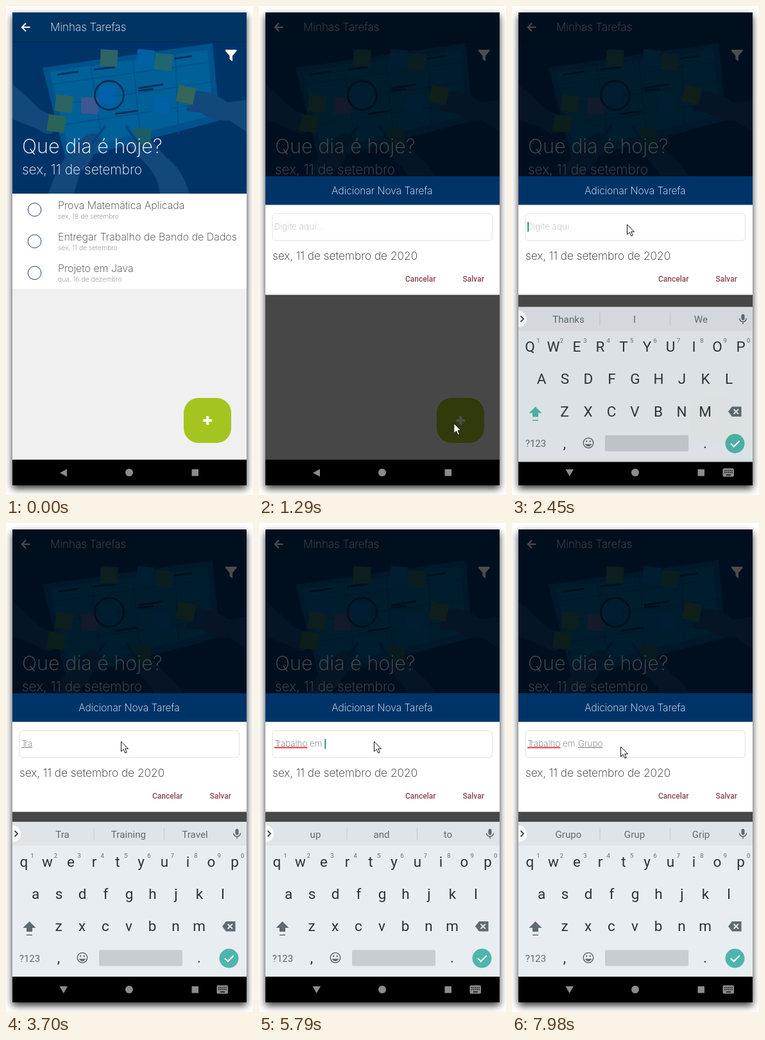
Write an HTML page that moves like this. It is 385 by 761 pixels and loops after 8 s.

```html
<!DOCTYPE html>
<html lang="pt">
<head>
<meta charset="utf-8">
<title>Minhas Tarefas</title>
<style>
html, body { margin: 0; width: 100%; height: 100%; overflow: hidden; background: #fff; }
.phone { position: absolute; left: 10px; top: 10px; width: 365px; height: 736px; box-shadow: 0 5px 11px rgba(0,0,0,.8); }
svg { position: absolute; left: 0; top: 0; display: block; }
text { white-space: pre; }
.thin { font-family: Inter, "Open Sans", sans-serif; font-weight: 200; }
.ui { font-family: Roboto, "Noto Sans", sans-serif; }
.mid { text-anchor: middle; }
.key { font-size: 22.5px; fill: #27343b; }
</style>
</head>
<body>
<div class="phone"></div>
<svg id="stage" width="385" height="761" viewBox="0 0 385 761">
  <defs>
    <clipPath id="heroClip"><rect x="10" y="56" width="365" height="236"/></clipPath>
    <clipPath id="screen"><rect x="10" y="10" width="365" height="736"/></clipPath>
  </defs>
  <g clip-path="url(#screen)">
    <rect x="10" y="56" width="365" height="236" fill="#003468"/>
    <g clip-path="url(#heroClip)" id="hero"></g>
    <rect x="10" y="10" width="365" height="46" fill="#003464"/>
    <rect x="10" y="55.5" width="365" height="1.5" fill="#002c58"/>
    <path d="M37.5 33H25M31 26.8L24.8 33L31 39.2" fill="none" stroke="#fff" stroke-width="2"/>
    <text class="thin" x="69" y="38.5" font-size="17" fill="#fff">Minhas Tarefas</text>
    <path d="M342 68h17.5v2l-6.5 7.5v8.5l-4.5 -3.2v-5.3l-6.5 -7.5z" fill="#fff"/>
    <text class="thin" x="25" y="229" font-size="30.6" fill="#fff">Que dia é hoje?</text>
    <text class="thin" x="25" y="261.5" font-size="21" fill="#fff">sex, 11 de setembro</text>
    <rect x="10" y="292" width="365" height="148" fill="#fff"/>
    <rect x="10" y="440" width="365" height="266" fill="#f0f0f0"/>
    <g id="tasks"></g>
    <rect x="277" y="610" width="74" height="70" rx="23" fill="#a4c520"/>
    <path d="M307.5 645h13.5M314.2 638.3v13.5" stroke="#fff" stroke-width="4"/>
    <rect id="strip" x="10" y="292" width="365" height="10.5" fill="#fff"/>
    <rect id="dim" x="10" width="365" height="736" fill="#000" opacity=".7"/>
    <rect x="10" y="706" width="365" height="40" fill="#000"/>
    <g id="keyboard"></g>
    <g fill="#8c8c8c">
      <path id="back"/>
      <circle cx="192" cy="726" r="6"/>
      <rect x="289.5" y="721" width="10.5" height="10.5"/>
      <g id="kbIcon">
        <rect x="328.5" y="719.5" width="17.5" height="13" rx="2"/>
        <path d="M331 723h13M331 726h13" stroke="#000" stroke-width="1.6" stroke-dasharray="1.6 1.2"/>
        <path d="M334 729.7h7" stroke="#000" stroke-width="1.4"/>
      </g>
    </g>
    <g id="dialog">
      <rect x="10" y="265" width="365" height="45" fill="#003468"/>
      <rect x="10" y="309.5" width="365" height="140" fill="#fff"/>
      <text class="thin mid" x="192" y="292.5" font-size="15.6" fill="#fff">Adicionar Nova Tarefa</text>
      <rect x="21" y="323" width="342.5" height="42" rx="5" fill="#fff" stroke="#dedede"/>
      <text class="thin" id="hint" x="23.5" y="348" font-size="13.6" fill="#b4b4b4">Digite aqui...</text>
      <g class="thin" id="words" font-size="13.5" fill="#666"></g>
      <path id="spell" stroke="#e8383c" stroke-width="1.8"/>
      <path id="compose" stroke="#777" stroke-width="1"/>
      <rect id="caret" y="336" width="1.6" height="15.5" fill="#00796f"/>
      <text class="thin" x="21" y="394.5" font-size="17.3" fill="#222">sex, 11 de setembro de 2020</text>
      <g class="ui" font-size="12" font-weight="500" fill="#8d4650">
        <text x="228" y="429">Cancelar</text>
        <text x="317.5" y="429">Salvar</text>
      </g>
    </g>
    <path id="cursor" d="M0 0V15.5L3.7 12.2L6.3 18L8.7 17L6.2 11.3H11Z" fill="#fff" stroke="#111" stroke-width="1"/>
  </g>
</svg>
<script>
const LOOP = 8000;
const $ = id => document.getElementById(id);
const show = (el, on) => el.setAttribute('visibility', on ? 'inherit' : 'hidden');
// latest row whose time has passed
const at = (rows, t) => rows.reduce((hit, row) => row[0] <= t ? row : hit, null);

function drawHero() {
  const note = (x, y, fill, turn) =>
    `<rect x="${x}" y="${y}" width="27" height="26" fill="${fill}" transform="rotate(${turn} ${x + 13} ${y + 13})"/>`;
  const notes = [
    [147, 68, '#2c6468', 3], [204, 68, '#0060a4', 6], [232, 74, '#206670', 5], [77, 139, '#2c6464', 6],
    [117, 142, '#3c5890', 2], [65, 170, '#2a6458', 8], [145, 126, '#0060aa', -3], [229, 141, '#0060a8', 6],
    [267, 125, '#356658', 12], [199, 190, '#1b5c68', 7]
  ];
  let rules = '';
  for (let i = 1; i < 4; i++) rules += `M${66 + 66 * i} ${102 - 9 * i}L${92 + 59 * i} ${223 - 8 * i}`;
  for (let i = 1; i < 4; i++) rules += `M${67 + 5 * i} ${90 + 32 * i}L${316 + 3 * i} ${56 + 31 * i}`;
  $('hero').innerHTML = `
    <path d="M57 96L322 58L333 178L94 242Z" fill="#00528c"/>
    <path d="M68 102L314 68L323 170L98 226Z" fill="#006098"/>
    <path d="${rules}" stroke="#005088" stroke-width="1.5" fill="none"/>
    <path d="M80 107L113 102M137 99L170 95M262 82L290 78M206 128L245 122M206 132L230 129M170 168L205 163"
      stroke="#00305e" stroke-width="3"/>
    <g fill="#12487c">
      <path d="M10 122Q30 138 54 162L70 169Q82 174 74 182L66 186L74 196Q66 204 50 192L10 176Z"/>
      <path d="M375 146L345 150Q318 130 292 133L272 138Q266 144 278 147L292 150Q276 160 284 164L304 166Q326 182 348 178L375 196Z"/>
      <path d="M66 292Q84 238 112 212Q130 194 142 200L150 208L140 218Q136 242 116 258L106 292Z"/>
      <path d="M286 292Q274 252 250 236L222 204Q208 194 204 202L212 216L198 210Q188 212 196 222L216 244Q236 262 240 292Z"/>
    </g>
    ${notes.map(n => note(...n)).join('')}
    <circle cx="161" cy="139" r="22.5" fill="none" stroke="#00305e" stroke-width="3"/>
    <path d="M122 228L154 188M218 232L188 188" stroke="#00467c" stroke-width="4" stroke-linecap="round"/>`;
}

function drawTasks() {
  const tasks = [
    ['Prova Matemática Aplicada', 'sex, 18 de setembro'],
    ['Entregar Trabalho de Bando de Dados', 'sex, 11 de setembro'],
    ['Projeto em Java', 'qua, 16 de dezembro']
  ];
  $('tasks').innerHTML = tasks.map(([name, when], i) => {
    const y = 317 + 49.2 * i;
    return `<circle cx="44.5" cy="${y}" r="10.3" fill="none" stroke="#1d3c74"/>
      <text class="thin" x="81" y="${y - 1}" font-size="16" fill="#333">${name}</text>
      <text class="thin" x="81" y="${y + 13.5}" font-size="10.4" fill="#777">${when}</text>`;
  }).join('');
}

function drawKeyboard() {
  const row = (letters, x0, y) => [...letters].map((c, i) =>
    `<text class="ui mid key letter" x="${x0 + 36.5 * i}" y="${y}">${c}</text>`).join('');
  const digits = [...'1234567890'].map((c, i) =>
    `<text class="ui mid" x="${41 + 36.4 * i}" y="520.5" font-size="9.5" fill="#5f6c74">${c}</text>`).join('');
  $('keyboard').innerHTML = `
    <rect x="10" y="465" width="365" height="241" fill="#e8edf1"/>
    <rect x="10" y="465" width="365" height="37" fill="#dfe4e8"/>
    <path d="M10 470.5a13 13 0 0 1 0 26z" fill="#fff"/>
    <path d="M13.5 479l4.5 4.5l-4.5 4.5" fill="none" stroke="#38444b" stroke-width="1.8"/>
    <path d="M137 474v20M246.5 474v20" stroke="#c3cacf"/>
    ${[88, 191, 294.5].map(x => `<text class="ui mid idea" x="${x}" y="489.5" font-size="15.2" fill="#5f6b73"></text>`).join('')}
    <rect x="357.5" y="476" width="5" height="9.5" rx="2.5" fill="#5c6a72"/>
    <path d="M354.5 482.5a5.5 5.5 0 0 0 11 0M360 488v3.5" fill="none" stroke="#5c6a72" stroke-width="1.5"/>
    ${digits}${row('qwertyuiop', 28, 534.5)}${row('asdfghjkl', 46, 584.5)}${row('zxcvbnm', 82, 635)}
    <path id="shift" d="M36.5 620l10 10h-5.5v6h-9v-6h-5.5zM32 640.5h9v1.6h-9z"/>
    <path d="M343 620h14.5v15.5h-14.5l-6 -7.75z" fill="#5c6a72"/>
    <path d="M345.5 624l7.5 7.5M353 624l-7.5 7.5" stroke="#e8edf1" stroke-width="1.8"/>
    <text class="ui mid" x="37" y="682.5" font-size="15" fill="#5c6a72">?123</text>
    <text class="ui mid key" x="82" y="684">,</text>
    <text class="ui mid key" x="301" y="684">.</text>
    <g fill="none" stroke="#5c6a72" stroke-width="1.5">
      <circle cx="119" cy="676.5" r="7.8"/><path d="M115 679q4 4.5 8 0z" fill="#5c6a72"/>
    </g>
    <circle cx="116.2" cy="674" r="1.2" fill="#5c6a72"/><circle cx="121.8" cy="674" r="1.2" fill="#5c6a72"/>
    <rect x="145" y="664.5" width="130" height="25" rx="2.5" fill="#c8cdd2"/>
    <circle cx="347.5" cy="677.5" r="15" fill="#4db6ac"/>
    <path d="M341 677.5l4.7 4.7l9 -9" fill="none" stroke="#fff" stroke-width="2.2"/>`;
}

// time, typed text, suggestions
const TYPING = [
  [0, '', 'Thanks|I|We'], [2920, 'T', 'T|The|To'], [3070, 'Tr', 'Tr|Try|True'], [3150, 'Tra', 'Tra|Training|Travel'],
  [4020, 'Trab', 'Trab|Track|Travel'], [4090, 'Traba', 'Traba|Tribal|Travel'],
  [4160, 'Trabal', 'Trabal|Tribal|Travel'], [4480, 'Trabal', 'Trabal|Trial|Tribal'],
  [4860, 'Trabalh', 'Trabalh|Tribal|Trabal'], [5010, 'Trabalho', 'Trabalho|Tribal|Trabalhos'],
  [5090, 'Trabalho ', 'and|the|is'], [5640, 'Trabalho e', 'e|even|every'], [5710, 'Trabalho em', 'em|me|empty'],
  [5790, 'Trabalho em ', 'up|and|to'], [6340, 'Trabalho em G', 'G|Good|Great'], [6570, 'Trabalho em Gr', 'Gr|Great|Green'],
  [6800, 'Trabalho em Gru', 'Gru|Group|Green'], [7270, 'Trabalho em Grup', 'Grup|Group|Groups'],
  [7430, 'Trabalho em Grupo', 'Grupo|Grup|Grip']
];
const CARET = [[0, 0], [2220, 1], [2750, 0], [2920, 1], [3700, 0], [4020, 1], [4480, 0], [4860, 1], [7900, 0]];
const SLIDE = [[0, 300, 0], [2370, 70, .6], [2450, 3.5, .93], [2520, 0, 1]];
const SLOTS = [24, 79, 103];

// pointer: entry, glide to the field, small drift at the end
const POINTER = [[0, -50, -50], [120, 340, 726], [200, 333, 706], [280, 320, 681], [350, 306, 659],
  [430, 295, 645], [510, 300, 651], [590, 307, 657]];
for (let i = 0; i < 11; i++) {
  const p = (i + 1) / 11, ease = p * p * (3 - 2 * p);
  POINTER.push([1290 + 77 * i, 307 - 139 * ease, 657 - 328 * ease]);
}
POINTER.push([2140, 179.5, 340], [7900, 174, 344], [7980, 169.5, 348]);

let lastText = null, lastIdeas = null;

function typeText(text, ideas) {
  if (text !== lastText) {
    const words = text ? text.split(' ') : [''];
    // the first two letters sit close together, like a ligature
    const tight = w => w.replace(/^Tr/, 'T<tspan dx="-.18em">r</tspan>');
    $('words').innerHTML = words.map((w, i) => `<text x="${SLOTS[i]}" y="347.5">${tight(w)}</text>`).join('');
    const ends = [...$('words').children].map((el, i) =>
      words[i] ? el.getEndPositionOfChar(words[i].length - 1).x : SLOTS[i] - .8);
    const last = words.length - 1;
    $('caret').setAttribute('x', text ? ends[last] + .3 : 24.3);
    $('compose').setAttribute('d', words[last] ? `M${SLOTS[last]} 349.5H${ends[last]}` : '');
    $('spell').setAttribute('d', last ? `M24 349.5H${ends[0]}` : '');
    show($('hint'), !text);
    const upper = !text;
    document.querySelectorAll('.letter').forEach(el => {
      el.textContent = upper ? el.textContent.toUpperCase() : el.textContent.toLowerCase();
    });
    $('shift').setAttribute('fill', upper ? '#4db6ac' : '#5c6a72');
    lastText = text;
  }
  if (ideas !== lastIdeas) {
    const parts = ideas.split('|');
    document.querySelectorAll('.idea').forEach((el, i) => el.textContent = parts[i]);
    lastIdeas = ideas;
  }
}

function render(t) {
  const open = t >= 910, settled = t >= 990, focused = t >= 2290;
  show($('strip'), open && !settled);
  show($('dim'), open);
  $('dim').setAttribute('y', settled ? 10 : 302.5);
  show($('dialog'), open);
  $('dialog').setAttribute('transform', `translate(0 ${settled ? 0 : 294})`);

  const [, drop, alpha] = at(SLIDE, t);
  show($('keyboard'), alpha > 0);
  $('keyboard').setAttribute('transform', `translate(0 ${drop})`);
  $('keyboard').setAttribute('opacity', alpha);
  show($('kbIcon'), focused);
  $('back').setAttribute('d', focused ? 'M83.5 721h12.5l-6.25 11z' : 'M84 726.5l11 -6v12z');

  const [, text, ideas] = at(TYPING, t);
  typeText(text, ideas);
  show($('caret'), at(CARET, t)[1]);

  const [, x, y] = at(POINTER, t);
  $('cursor').setAttribute('transform', `translate(${x.toFixed(1)} ${y.toFixed(1)})`);
}

drawHero();
drawTasks();
drawKeyboard();
(function tick() {
  render(performance.now() % LOOP);
  requestAnimationFrame(tick);
})();
</script>
</body>
</html>
```
